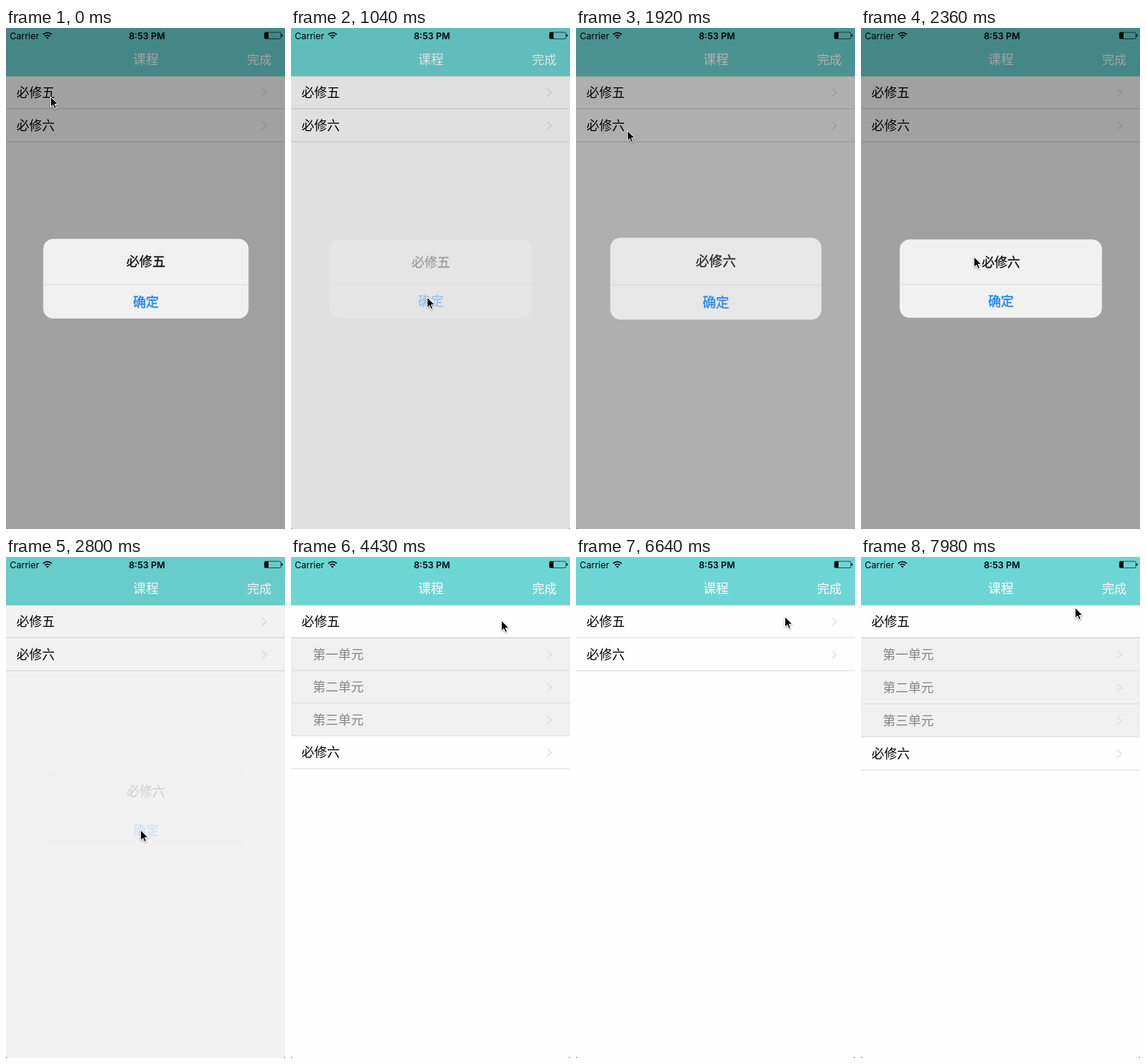
Recreate the animation shown at these times as an HTML page. Size 372 by 667 pixels, loop 8 s.

```html
<!DOCTYPE html>
<html lang="zh-CN">
<head>
<meta charset="utf-8">
<title>课程</title>
<style>
  html, body { margin: 0; width: 100%; height: 100%; overflow: hidden; background: #777; }
  svg { display: block; width: 372px; height: 667px; border-radius: 0 0 3px 3px; }
  text { font: 17px "Noto Sans CJK SC", "Noto Sans CJK", sans-serif; }
  .status text { font: 12px Inter, Roboto, sans-serif; }
  .status .clock { font-weight: 600; text-anchor: middle; }
  .nav { fill: #fff; }
  .mid { text-anchor: middle; }
  .line { fill: #dedee0; }
  .chevron { fill: none; stroke: #cfcfd3; stroke-width: 1; }
  .unit text { fill: #858585; }
  .alert text { font-weight: 500; text-anchor: middle; stroke-width: .3; }
  .cursor { filter: drop-shadow(0 1px 1px rgba(0, 0, 0, .35)); }
</style>
</head>
<body>
<svg viewBox="0 0 372 667">
  <defs>
    <path id="chevron" class="chevron" d="M341.5 17l6 5-6 5"/>
    <rect id="line" class="line" y="-1" width="372" height="1"/>
  </defs>
  <rect width="372" height="667" fill="#fefefe"/>

  <g transform="translate(0 64)">
    <text x="14" y="28">必修五</text>
    <use id="topChevron" href="#chevron"/>
  </g>
  <g id="units"></g>
  <g id="lastRow">
    <rect width="372" height="44" fill="#fefefe"/>
    <text x="14" y="28">必修六</text>
    <use href="#chevron"/>
    <use href="#line"/>
    <use href="#line" y="44"/>
  </g>
  <rect y="107" width="372" height="1" class="line"/>
  <rect id="edge" y="107" width="372" height="1" fill="#cbcbcd"/>

  <rect width="372" height="64" fill="#6dd6d5"/>
  <rect y="64" width="372" height="1" fill="#d9e4e4"/>
  <text class="nav mid" x="186.5" y="48">课程</text>
  <text class="nav" x="321.5" y="47.5" style="font-size:16.3px">完成</text>
  <g class="status">
    <text x="5" y="14.5">Carrier</text>
    <text class="clock" x="187.8" y="14.5">8:53 PM</text>
    <g fill="none" stroke="#000" stroke-width="1.7">
      <path d="M49.6 8.6a8 8 0 0 1 11.3 0M51.9 11a4.8 4.8 0 0 1 6.7 0"/>
      <path d="M55.25 14.4l-1.8-1.9a2.6 2.6 0 0 1 3.6 0z" fill="#000" stroke="none"/>
    </g>
    <rect x="344.5" y="5.8" width="22" height="8.6" rx="1.5" fill="none" stroke="#000" stroke-width=".8" stroke-opacity=".8"/>
    <rect x="345" y="6" width="5" height="8"/>
    <path d="M367.4 8.2q1.6 0 1.6 1.8t-1.6 1.8z"/>
  </g>

  <rect id="dim" width="372" height="667"/>
  <g id="alert" class="alert">
    <rect x="-134.5" y="-52" width="269" height="104" rx="13" fill="#f1f1f1"/>
    <rect x="-134.5" y="7.5" width="269" height="1" fill="#dcdcde"/>
    <text id="title" y="-16" fill="#111" stroke="#111"></text>
    <text y="36.5" fill="#1580fb" stroke="#1580fb">确定</text>
  </g>

  <path id="cursor" class="cursor" fill="#000" stroke="#fff"
        d="M.5.5V14.3L3.7 11.3 5.9 16.4 8.2 15.4 6 10.4H10.4Z"/>
</svg>
<script>
  const LOOP = 8000, STEP = 147.3, ROW = 44;
  const $ = id => document.getElementById(id);
  const clamp = v => Math.max(0, Math.min(1, v));
  const ease = v => { v = clamp(v); return v * v * (3 - 2 * v); };

  const alerts = [
    { title: '必修五', open: -1.85, close: 6.32 },
    { title: '必修六', open: 12.15, close: 18.13 }
  ];
  const toggles = [24, 29.8, 35, 40.8, 45], TOGGLE = 3;
  const home = { x: 59, y: 91 };
  const glides = [
    { from: 0, to: 5, x: 181, y: 358 },
    { from: 8, to: 10, x: 68, y: 136 },
    { from: 14, to: 17, x: 179, y: 363 },
    { from: 20, to: 23, x: 280, y: 84 },
    { from: 43, to: 45, x: 278, y: 79 },
    { from: 48, to: 54, x: 285, y: 67 }
  ];

  $('units').innerHTML = ['一', '二', '三'].map(c => `<g class="unit">
    <rect width="372" height="44" fill="#f0f0f0"/>
    <text x="29" y="28">第${c}单元</text>
    <use href="#chevron"/><use href="#line"/></g>`).join('');
  const units = [...document.querySelectorAll('.unit')];

  const move = (el, x, y, s = 1) =>
    el.setAttribute('transform', `translate(${x} ${y}) scale(${s})`);

  function drawList(n) {
    const open = toggles.reduce((sum, t, i) =>
      sum + (i % 2 ? -1 : 1) * ease((n - t) / TOGGLE), 0);
    units.forEach((u, i) => {
      move(u, 0, 108 + ROW * i * open);
      u.style.opacity = open;
    });
    move($('lastRow'), 0, 108 + ROW * units.length * open);
    $('edge').style.opacity = open;
    $('topChevron').style.opacity = open > 0 ? 0 : 1;
  }

  function drawAlert(n) {
    const a = alerts.find(a => n < a.close + 1) || alerts[1];
    const alpha = Math.min(clamp(n - a.open), clamp(1 - n + a.close));
    $('title').textContent = a.title;
    $('alert').style.opacity = alpha;
    $('dim').style.opacity = .37 * alpha;
    move($('alert'), 186.5, 333.7, 1 + .107 * .38 ** Math.max(0, n - a.open));
  }

  function drawCursor(n) {
    let { x, y } = home;
    for (const g of glides) {
      const f = ease((n - g.from) / (g.to - g.from));
      x += (g.x - x) * f;
      y += (g.y - y) * f;
    }
    // One last sweep to the left and back along a loop.
    const a = Math.PI * clamp((n - 48) / 6);
    x -= 165 * Math.sin(a) ** 2;
    y += 40 * Math.sin(a) + 32 * Math.sin(2 * a);
    move($('cursor'), x, y);
  }

  // The picture is held between steps.
  function tick() {
    const n = Math.floor(performance.now() % LOOP / STEP);
    drawList(n);
    drawAlert(n);
    drawCursor(n);
    requestAnimationFrame(tick);
  }
  tick();
</script>
</body>
</html>
```
